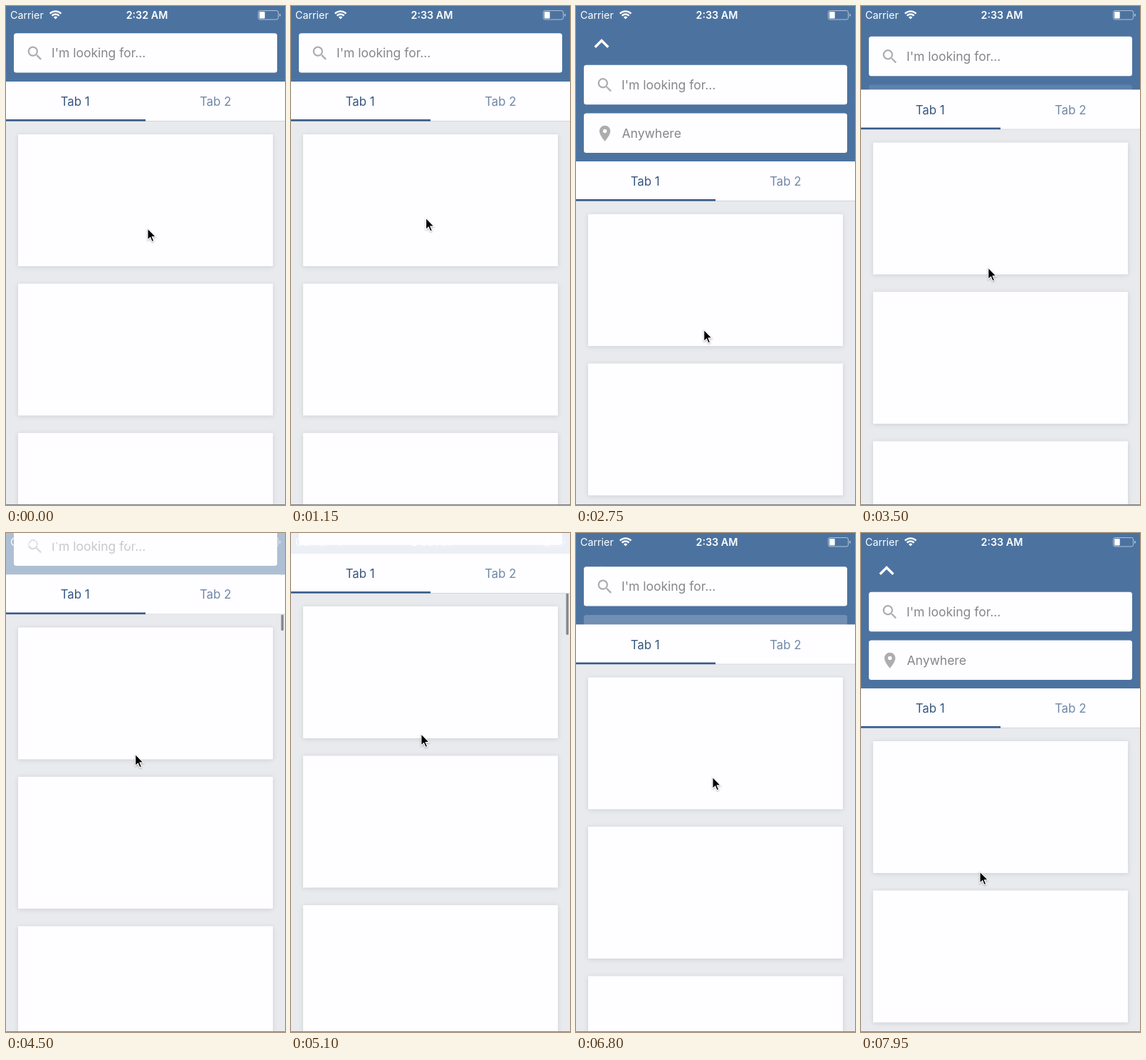
Recreate the animation shown at these times as an HTML page. Size 392 by 700 pixels, loop 8 s.

```html
<!DOCTYPE html>
<html lang="en">
<head>
<meta charset="utf-8">
<style>
  html, body { margin: 0; width: 100%; height: 100%; overflow: hidden; }
  svg { display: block; width: 392px; height: 700px; font-family: Inter, sans-serif; }
  #cards { fill: #fefdff; filter: drop-shadow(0 1px 3px rgba(60, 70, 85, .16)); }
  .field rect { fill: #fefdff; }
  .field path { fill: #adadad; }
  .field text { fill: #868688; font-size: 17.5px; }
  .tab { font-size: 16.8px; text-anchor: middle; }
  .status { fill: #fff; font-size: 14.3px; }
</style>
</head>
<body>
<svg viewBox="0 0 392 700">
  <defs>
    <rect id="card" x="17" y="74" width="358" height="185" rx="1"/>
    <rect id="box" x="11" width="370" height="55.4" rx="3.5"/>
  </defs>
  <rect width="392" height="700" fill="#e8eaed"/>
  <g id="cards">
    <use href="#card"/>
    <use href="#card" y="209.5"/>
    <use href="#card" y="419"/>
    <use href="#card" y="628.5"/>
  </g>
  <rect id="thumb" x="386.5" width="3.5" height="140" rx="1.7" fill="#88898d"/>

  <rect class="bar" width="392" fill="#fefdff"/>
  <g id="header">
    <rect class="bar" width="392" fill="#4c73a0"/>
    <path id="chevron" fill="#fff" transform="translate(15 32) scale(1.75)"
      d="M12 8l-6 6 1.41 1.41L12 10.83l4.59 4.58L18 14z"/>
    <g id="place" class="field">
      <rect x="11" width="370" height="55.4" rx="3.5"/>
      <path transform="translate(27.4 15) scale(1.1)" fill-rule="evenodd"
        d="M12 2C8.1 2 5 5.1 5 9c0 5.25 7 13 7 13s7-7.75 7-13c0-3.9-3.1-7-7-7zm0 9.5a2.5 2.5 0 0 1 0-5 2.5 2.5 0 0 1 0 5z"/>
      <text x="64.5" y="34">Anywhere</text>
    </g>
    <g id="search" class="field">
      <rect x="11" width="370" height="55.4" rx="3.5"/>
      <path transform="translate(27.4 15) scale(1.1)"
        d="M15.5 14h-.8l-.3-.3A6.5 6.5 0 1 0 13.7 14.4l.3.3v.8l5 5L20.5 19zm-6 0a4.5 4.5 0 1 1 0-9 4.5 4.5 0 0 1 0 9z"/>
      <text x="64" y="34">I'm looking for...</text>
    </g>
  </g>

  <g id="tabs">
    <rect width="392" height="56" fill="#fefdff"/>
    <rect y="55" width="392" height="1" fill="#d3d6da"/>
    <rect y="53" width="196" height="2.6" fill="#385b8a"/>
    <text class="tab" x="97.2" y="34" fill="#365780">Tab 1</text>
    <text class="tab" x="294.3" y="34" fill="#7088a8">Tab 2</text>
  </g>

  <g class="status">
    <text x="6" y="18">Carrier</text>
    <text id="clock" x="198" y="18" font-weight="600" text-anchor="middle"></text>
    <path d="M61.8 10.6a11 11 0 0 1 15.6 0M64.6 13.6a7 7 0 0 1 10 0" fill="none" stroke="#fff" stroke-width="2.3"/>
    <path d="M69.6 18.6l-2.7-2.8a3.8 3.8 0 0 1 5.4 0z"/>
    <rect x="354.5" y="6.5" width="28" height="12.5" rx="2.5" fill="none" stroke="#fff" stroke-opacity=".55"/>
    <rect x="356" y="8" width="7.7" height="9.5" rx="1"/>
    <path d="M384 10.7a2 2 0 0 1 0 4z" fill-opacity=".55"/>
  </g>
  <rect y="699" width="392" height="1" fill="#828386"/>
  <path id="cursor" stroke="#fff" stroke-width="1.1" filter="drop-shadow(0 1px 1px rgba(0,0,0,.3))"
    d="M0 0v16.2l3.7-3.5 2.5 5.9 2.6-1.1-2.5-5.8h5.1z"/>
</svg>
<script>
const LOOP = 8000, HIDDEN = 22, COLLAPSED = 106, EXPANDED = 218;
const $ = id => document.getElementById(id);
const bars = document.querySelectorAll('.bar');
const clamp = v => Math.max(0, Math.min(1, v));
const mix = (a, b, u) => a + (b - a) * u;

// Header drags; drag is how strongly each one slows down.
const drags = [
  { start: 1540, end: 2720, to: EXPANDED, drag: .2 },
  { start: 2890, end: 3710, to: COLLAPSED, drag: .8 },
  { start: 3830, end: 5300, to: HIDDEN, drag: .44 },
  { start: 5480, end: 6300, to: COLLAPSED, drag: .43 },
  { start: 6670, end: 7600, to: EXPANDED, drag: .5 },
];

// The pointer travels with the header; grip is its distance below the header's edge.
const grips = [
  { at: 30, x: 199, grip: 206 },
  { at: 1500, x: 188, grip: 189 },
  { at: 2400, x: 186, grip: 189 },
  { at: 2900, x: 178, grip: 249 },
  { at: 5300, x: 183, grip: 253 },
  { at: 5480, x: 183, grip: 284 },
  { at: 5800, x: 183, grip: 284 },
  { at: 6750, x: 192, grip: 214 },
  { at: 7600, x: 183, grip: 200 },
  { at: 7780, x: 183, grip: 200 },
  { at: 7950, x: 167, grip: 257 },
];

function headerHeight(t) {
  return drags.reduce((height, { start, end, to, drag }) => {
    const u = clamp((t - start) / (end - start));
    return mix(height, to, u * (1 + drag * (1 - u)));
  }, COLLAPSED);
}

function pointer(t) {
  const next = grips.findIndex(g => g.at > t);
  const b = grips.at(next), a = next > 0 ? grips[next - 1] : b;
  const u = clamp((t - a.at) / (b.at - a.at || 1)), eased = u * u * (3 - 2 * u);
  return { x: mix(a.x, b.x, eased), grip: mix(a.grip, b.grip, eased) };
}

const move = (id, x, y) => $(id).setAttribute('transform', `translate(${x} ${y})`);
const fade = (id, value) => $(id).setAttribute('opacity', clamp(value));

function draw(now) {
  const t = now % LOOP;
  const height = headerHeight(t);
  const open = clamp((height - COLLAPSED) / (EXPANDED - COLLAPSED));
  const searchY = Math.min(height, COLLAPSED) - 67.8 + 44.6 * open;
  const { x, grip } = pointer(t);

  bars.forEach(bar => bar.setAttribute('height', height));
  move('cards', 0, height);
  move('tabs', 0, height);
  move('search', 0, searchY);
  move('place', 0, searchY + 67.8);
  move('thumb', 0, 8.8 - height * .2);
  move('cursor', x, height + grip);
  fade('place', open);
  fade('chevron', open);
  fade('thumb', COLLAPSED - height);
  fade('header', (height - 20) / (COLLAPSED - 20));
  $('clock').textContent = t < 400 ? '2:32 AM' : '2:33 AM';
  requestAnimationFrame(draw);
}
requestAnimationFrame(draw);
</script>
</body>
</html>
```
